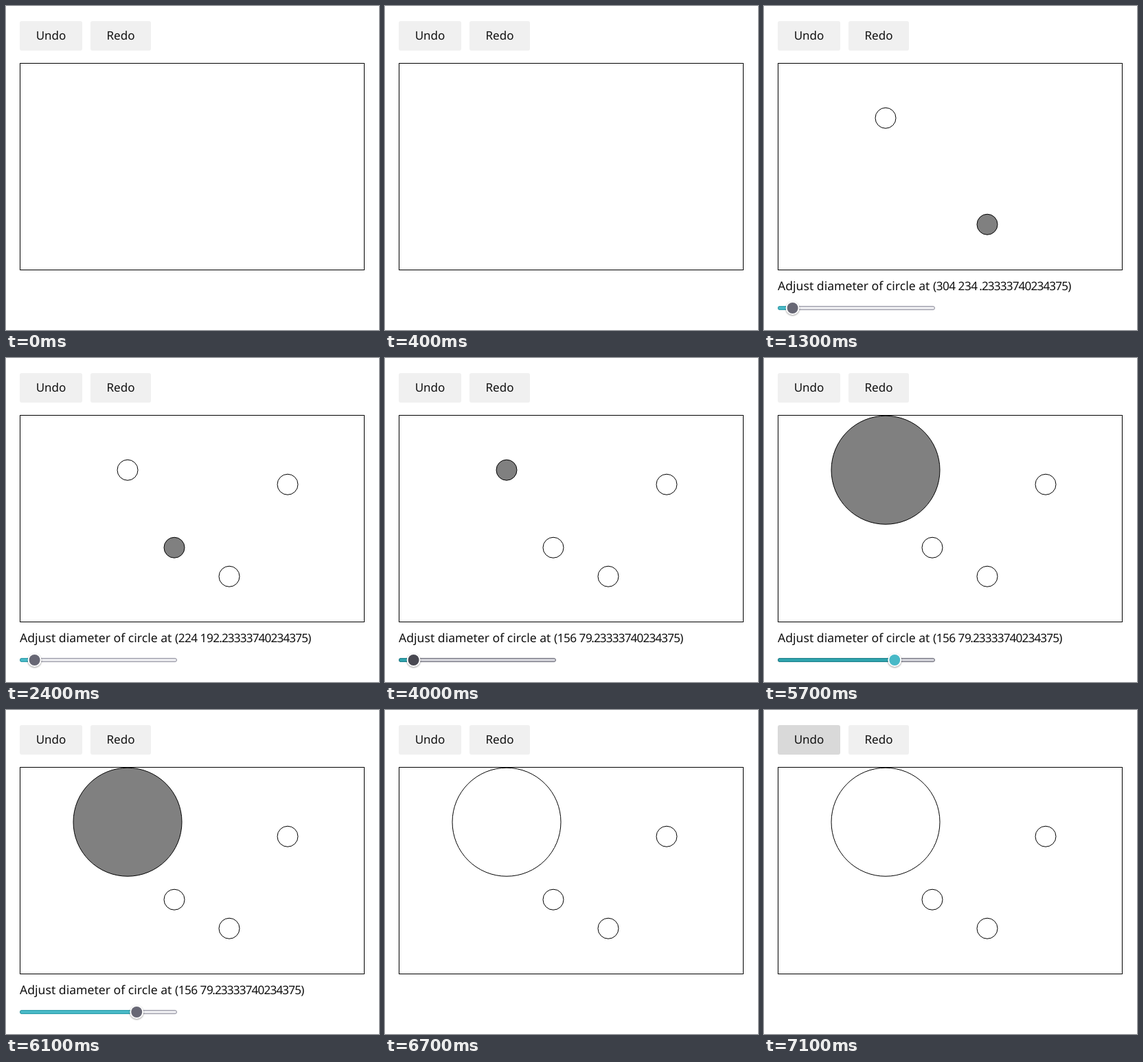
These frames come from a looping animation (543 px wide and 472 px high, 8000 ms). An HTML page:

```html
<!DOCTYPE html>
<html lang="en">
<head>
<meta charset="utf-8">
<title>Circle drawer</title>
<style>
  html, body { margin: 0; width: 100%; height: 100%; overflow: hidden; background: #fff; }
  svg { display: block; width: 543px; height: 472px; }
  text { font: 17px "Noto Sans", "Open Sans", sans-serif; fill: #111; text-rendering: geometricPrecision; }
  .button text { text-anchor: middle; }
  .label { font-size: 17.6px; }
  .coords { font-size: 17.2px; letter-spacing: -.5px; }
  .tail { letter-spacing: -.88px; text-anchor: end; }
  .thumb { filter: drop-shadow(0 1px 1.2px rgba(0, 0, 0, .4)); }
</style>
</head>
<body>
<svg viewBox="0 0 543 472">
  <g class="button">
    <rect id="undo" x="20" y="22" width="91" height="43" rx="3"/>
    <text x="65.5" y="49">Undo</text>
  </g>
  <g class="button">
    <rect id="redo" x="123" y="22" width="88" height="43" rx="3"/>
    <text x="167" y="49">Redo</text>
  </g>
  <g id="circles" stroke="#000"></g>
  <rect x="20.5" y="83.5" width="501" height="301" fill="none" stroke="#000"/>
  <g id="panel">
    <text class="label" x="20" y="414">Adjust diameter of circle at</text>
    <text class="coords" id="head" x="246" y="414"></text>
    <text class="coords tail" id="tail" y="414">.23333740234375)</text>
    <rect id="track" x="20.5" y="437.5" width="228" height="5" rx="2.5"/>
    <rect id="fill" x="20.5" y="437.5" height="5" rx="2.5"/>
    <circle class="thumb" id="outer" cy="440" r="10" fill="#fff"/>
    <circle id="inner" cy="440" r="8"/>
  </g>
</svg>
<script>
const LOOP = 8000;
const $ = id => document.getElementById(id);
const set = (el, attrs) => {
  for (const k in attrs) el.setAttribute(k, attrs[k]);
};

// Position in the drawing area, time of creation, right end of the label
const circles = [
  { x: 156, y: 79, born: 700, end: 433.5 },
  { x: 304, y: 234, born: 1300, end: 446.5 },
  { x: 389, y: 100, born: 1900, end: 446.5 },
  { x: 224, y: 192, born: 2400, end: 443.5 }
];

for (const c of circles) {
  c.el = document.createElementNS("http://www.w3.org/2000/svg", "circle");
  set(c.el, { cx: c.x + 21, cy: c.y + 84.23 });
  $("circles").append(c.el);
}

// Last value whose start time has passed
const at = (t, steps) => steps.reduce((v, [start, next]) => t >= start ? next : v, null);
const within = (t, a, b) => t >= a && t < b;

const selection = [
  [0, -1], [700, 0], [1300, 1], [1900, 2], [2400, 3], [3300, 0], [6700, -1]
];
const diameter = [[0, 30], [4500, 107], [5700, 158]];

function drawSlider(t, d) {
  const hover = within(t, 4000, 6100);
  const active = within(t, 4400, 5800);
  const x = 30 + 209 * (d - 20) / 180;
  set($("track"), {
    fill: hover ? "#d0d0d7" : "#e9e9ed",
    stroke: hover ? "#676774" : "#8f8f9d"
  });
  set($("fill"), {
    width: x - 20.5,
    fill: hover ? "#2fa3ad" : "#48b9c7",
    stroke: hover ? "#20808a" : "#2f9ca8"
  });
  set($("outer"), { cx: x });
  set($("inner"), { cx: x, fill: active ? "#48b9c7" : hover ? "#484851" : "#676774" });
}

function draw(t) {
  const selected = at(t, selection);
  const d = at(t, diameter);
  const shade = on => ({ fill: on ? "#d9d9d9" : "#f0f0f0" });
  set($("undo"), shade(t >= 7100));
  set($("redo"), shade(within(t, 300, 400)));

  circles.forEach((c, i) => set(c.el, {
    r: i ? 15 : d / 2,
    fill: i === selected ? "#808080" : "#fff",
    visibility: t >= c.born ? "visible" : "hidden"
  }));

  const c = circles[selected];
  set($("panel"), { visibility: c ? "visible" : "hidden" });
  if (!c) return;
  $("head").textContent = `(${c.x} ${c.y}`;
  set($("tail"), { x: c.end });
  drawSlider(t, d);
}

const start = performance.now();
function tick() {
  draw((performance.now() - start) % LOOP);
  requestAnimationFrame(tick);
}
tick();
</script>
</body>
</html>
```
